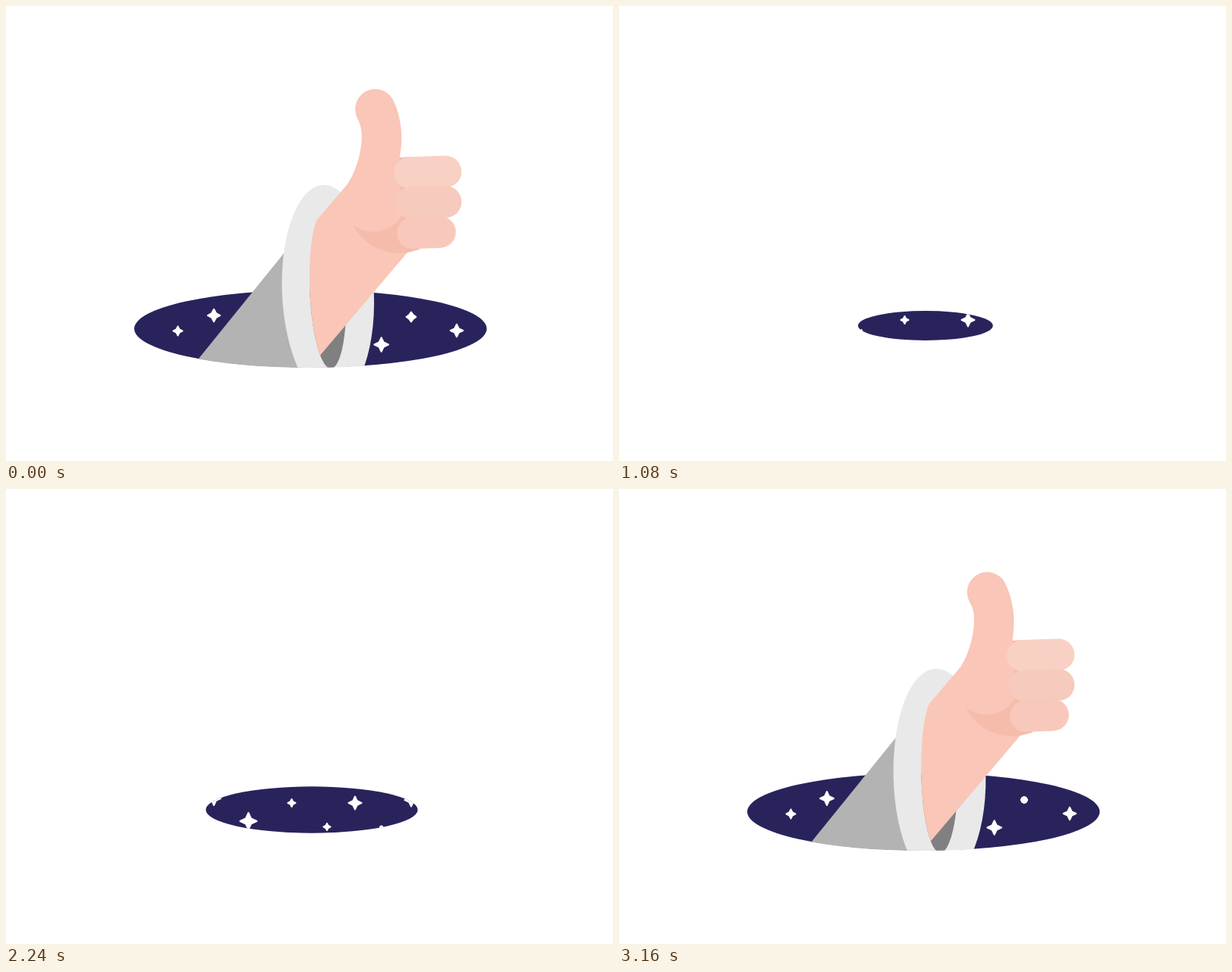
Recreate the animation shown at these times as an HTML page with a canvas. Size 800 by 600 pixels, loop 3200 ms.

```html
<!DOCTYPE html>
<html lang="en">
<head>
<meta charset="utf-8">
<title>Thumbs up</title>
<style>
html, body { margin: 0; width: 100%; height: 100%; overflow: hidden; background: #fff; }
canvas { display: block; }
</style>
</head>
<body>
<canvas id="stage" width="800" height="600"></canvas>
<script>
const ctx = document.getElementById('stage').getContext('2d');
const LOOP = 3200;
const NAVY = '#29235c', SKIN = '#f9c6b8', YELLOW = '#ffde00';
const FINGERS = ['#f9d0c4', '#f6cabd', '#f9c8bc'];

const span = (t, a, b) => Math.min(1, Math.max(0, (t - a) / (b - a)));
const sine = u => (1 - Math.cos(Math.PI * u)) / 2;
const cubicOut = u => 1 - (1 - u) ** 3;

function fill(path, color) {
  ctx.fillStyle = color;
  ctx.fill(typeof path === 'string' ? new Path2D(path) : path);
}

function star(x, y, tip, waist, stroke, color) {
  ctx.beginPath();
  for (let i = 0; i < 8; i++) {
    const a = i * Math.PI / 4;
    const r = i % 2 ? waist * Math.SQRT2 : tip;
    ctx.lineTo(x + r * Math.cos(a), y + r * Math.sin(a));
  }
  ctx.closePath();
  ctx.fillStyle = ctx.strokeStyle = color;
  ctx.lineWidth = stroke;
  ctx.lineJoin = 'round';
  ctx.fill();
  ctx.stroke();
}

// A star in the hole; around the time "dip" it shrinks to a dot
function twinkle(t, x, y, r, dip = Infinity) {
  const away = Math.abs(t - dip);
  const gap = Math.min(away, Math.abs(LOOP - away));
  const tip = 2 + (r - 3) * sine(span(gap, 220, 400));
  star(x, y, tip, Math.min(0.29 * r, 0.7 * tip), 2, '#fff');
}

function night(t) {
  twinkle(t, 226.5, 428.5, 7);
  twinkle(t, 274, 408, 10, 360);
  twinkle(t, 319.5, 438, 12);
  twinkle(t, 376.5, 414, 6);
  twinkle(t, 423, 445.5, 5.5);
  twinkle(t, 460, 414, 9.5);
  twinkle(t, 494.7, 446.5, 10.3, 2240);
  twinkle(t, 534, 410, 9.5, 2870);
  twinkle(t, 594, 428, 9.3, 580);
}

// Yellow star that grows from its start until all of them fade together
function sparkle(t, x, y, size, start) {
  const r = size * sine(span(t, start, 1897)) * (1 - sine(span(t, 1880, 2130)));
  if (r > 0.1) star(x, y, 0.867 * r, 0.15 * r, 0.266 * r, YELLOW);
}

// Ellipse, or the lower part of it, strung along the curved axis mid(y)
function oval(mid, cy, rx, ry, turn = 2 * Math.PI) {
  const path = new Path2D();
  for (let i = 0; i <= 60; i++) {
    const a = turn * i / 60, y = cy + ry * Math.sin(a);
    path.lineTo(mid(y) + rx * Math.cos(a), y);
  }
  path.closePath();
  return path;
}

function thumb(d) {
  const x = 487 + d, y = 136, r = 26.5, a = 2.71 + 0.012 * d;
  const dx = r * Math.cos(a), dy = r * Math.sin(a);
  const m = 0.55 * d;
  fill(`M446,241 C460,222 ${469 + m},195 ${469 + m},172
    C${469 + m},162 ${467 + 0.8 * d},155 ${x + dx},${y + dy}
    A${r},${r} 0 0 1 ${x - dx},${y - dy}
    C${519 + 0.8 * d},142 ${521.7 + m},160 ${521.5 + m},175
    C${521.5 + m},185 ${520 + 0.3 * d},194 518,205
    L522,270 L521,277 C508,300 477,304 457,288 L430,262Z`, SKIN);
}

function fingers() {
  ctx.lineWidth = 41.8;
  ctx.lineCap = 'round';
  FINGERS.forEach((color, i) => {
    const x = 532 + 2.1 * i, y = 219.8 + 39.8 * i;
    ctx.strokeStyle = color;
    ctx.beginPath();
    ctx.moveTo(x, y);
    ctx.lineTo(i < 2 ? 579.5 : 572, y - 1.3);
    ctx.stroke();
  });
}

function arm(t, drop) {
  // Cuff and thumb swing like damped springs after the rise
  const late = t < 1200 ? t + LOOP : t;
  const swing = (amp, decay) => amp * Math.exp(-decay * Math.max(0, late - 2600))
    * Math.cos(2 * Math.PI * (late - 2660) / 670);
  const drag = t < 1200 ? Math.min(1, drop / 181) : 0;
  const tilt = -0.09 + 1.09 * swing(1.18, 0.0028) - 0.1 * drag;
  const lean = -1.7 + swing(11.2, 0.00178) - 6.2 * drag;

  const cy = 378 - 3 * tilt, ry = 142 + 8 * tilt;
  const mid = y => {
    const v = (y - cy) / ry;
    return 424.5 + 21.5 * tilt + (5.5 + 31.5 * tilt) * v + 19 * tilt * v * v;
  };
  const inner = [mid, 374 - 13 * tilt, 24 - tilt, 104 - 4 * tilt];
  const top = inner[1] - inner[3], bottom = inner[1] + inner[3];
  const edge = 372 + 17 * tilt;

  ctx.save();
  ctx.translate(-0.072 * drop, drop);
  fill(`M220,507 L${edge},${465 - (edge - 254) * 1.238} L453,450 L400,516Z`, '#b3b3b3');
  fill(oval(mid, cy, 60.5 - 3.5 * tilt, ry), '#e9e9e9');
  fill(oval(...inner, Math.PI), '#808080');

  // The wrist comes out of the cuff and passes over its right side
  const outside = oval(...inner);
  outside.addPath(new Path2D(`M${mid(top)},${top} V-400 H900 V900 H${mid(bottom)} V${bottom}Z`));
  ctx.clip(outside);
  fill('M449,236 L415,276 L340,366 L390,489 L529,325 L525,250 L518,205Z', SKIN);
  fill('M457,288 C470,315 500,330 530,325 L545,321 V210 L530,199 L517,200 L500,260Z', '#f5bcab');
  thumb(lean);
  fingers();
  ctx.restore();
}

function draw(t) {
  ctx.clearRect(0, 0, 800, 600);

  const open = t < 1700 ? 1 - sine(span(t, 730, 1340)) : cubicOut(span(t, 2043, 2793));
  if (open > 0) {
    const cx = 405.5 - 4.2 * open, cy = 419 + 6.6 * open;
    const rx = 232.3 * open, ry = 51 * open;

    ctx.save();
    ctx.beginPath();
    ctx.ellipse(cx, cy, rx, ry, 0, 0, 2 * Math.PI);
    ctx.fillStyle = NAVY;
    ctx.fill();
    ctx.clip();
    night(t);
    ctx.restore();

    if (t < 886 || t > 2240) {
      const drop = 370 * (t < 1200 ? span(t, 600, 886) ** 2 : 1 - cubicOut(span(t, 2240, 2600)));
      ctx.save();
      ctx.beginPath();
      ctx.moveTo(cx - rx, 0);
      ctx.lineTo(cx + rx, 0);
      ctx.ellipse(cx, cy, rx + 0.5, ry + 0.5, 0, 0, Math.PI);
      ctx.clip();
      arm(t, drop);
      ctx.restore();
    }
  }

  sparkle(t, 348.2, 402.8, 95, 1358);
  sparkle(t, 460, 469, 37, 1565);
  sparkle(t, 435, 336, 36, 1600);
}

const begin = performance.now();
function tick() {
  draw((performance.now() - begin) % LOOP);
  requestAnimationFrame(tick);
}
tick();
</script>
</body>
</html>
```
